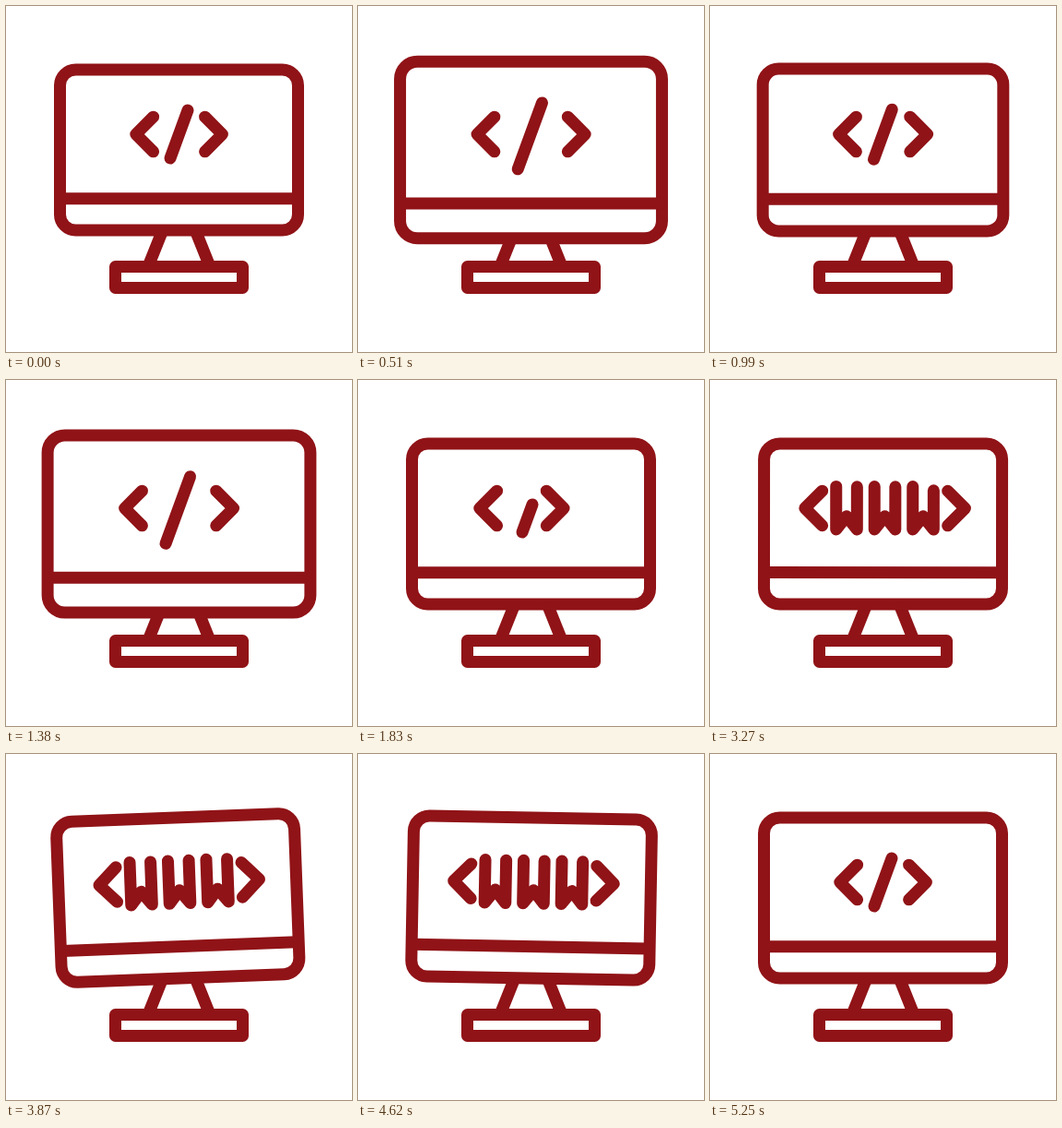
Animation, 375 px wide and 375 px high, one loop 5.4 s. Source, as an HTML page with a canvas:

```html
<!DOCTYPE html>
<html lang="en">
<head>
<meta charset="utf-8">
<title>Code monitor</title>
<style>
html, body { margin: 0; width: 100%; height: 100%; overflow: hidden; background: #fff; }
canvas { display: block; }
</style>
</head>
<body>
<canvas id="stage" width="375" height="375"></canvas>
<script>
const ctx = document.getElementById('stage').getContext('2d');
const LOOP = 5400;
const clamp = v => Math.min(1, Math.max(0, v));
const part = (t, a, b) => clamp((t - a) / (b - a));
const ease = p => (1 - Math.cos(Math.PI * p)) / 2;
const mix = (a, b, p) => a + (b - a) * p;

// Value at time t along [time, value] keys, eased between neighbours
function track(t, keys) {
  let value = keys[0][1];
  for (let i = 1; i < keys.length; i++) {
    const [t0, v0] = keys[i - 1], [t1, v1] = keys[i];
    if (t >= t0) value = mix(v0, v1, ease(part(t, t0, t1)));
  }
  return value;
}

function line(points) {
  ctx.beginPath();
  points.forEach(([x, y]) => ctx.lineTo(x, y));
  ctx.stroke();
}

function box(x, y, w, h, r) {
  ctx.beginPath();
  ctx.roundRect(x, y, w, h, r);
  ctx.fill();
  ctx.stroke();
}

function chevron(x, dir) {
  line([[x - dir * 18.8, 120.2], [x, 139], [x - dir * 18.8, 157.8]]);
}

// Letter W, drawn from its first stroke up to the share p
function letter(x, p) {
  if (p <= 0) return;
  ctx.setLineDash([129 * p, 300]);
  line([[x - 11.3, 115.5], [x - 11.3, 162], [x, 147.8], [x + 11.3, 162], [x + 11.3, 115.5]]);
  ctx.setLineDash([]);
}

function stand() {
  line([[171, 240], [155, 280]]);
  line([[204, 240], [220, 280]]);
  box(118.5, 282.5, 138, 23, 0);
}

function screen(pulse) {
  const s = 1 + 0.105 * pulse;
  const x = 187.5 - 129 * s, right = 187.5 + 129 * s;
  const y = 156 - 87 * s, divider = 156 + 52.7 * s;
  box(x, y, 258 * s, 174 * s, 17 * s);
  line([[x + 2, divider], [right - 2, divider]]);
}

function text(t, pulse) {
  // Typing runs forward, then rewinds before the loop closes
  const u = t < 4650 ? t : mix(3300, 1750, part(t, 4650, 5220));
  const spread = 12.3 * pulse;
  const left = -38 * ease(part(u, 1750, 2000));
  const right = u < 1980
    ? -41 * ease(part(u, 1750, 1980))
    : mix(-41, 42, part(u, 1980, 3100));
  chevron(140.8 + left - spread, -1);
  chevron(234.4 + right + spread, 1);

  const slash = 1 - ease(part(u, 1750, 1930));
  if (slash > 0) {
    const k = 1 + 0.4 * pulse, reach = k * (2 * slash - 1);
    const cx = 187.5 - 1.2 * pulse, cy = 139 + 2 * pulse;
    line([[cx - 9.5 * k, cy + 26 * k], [cx + 9.5 * reach, cy - 26 * reach]]);
  }
  [1940, 2500, 3040].forEach((start, i) =>
    letter(148 + 41.5 * i, ease(part(u, start, start + 260))));
}

function draw(t) {
  const pulse = t < 1800 ? (1 - Math.cos(2 * Math.PI * t / 900)) / 2 : 0;
  const tilt = track(t, [[3250, 0], [3550, 3.5], [4000, -3.5],
                         [4440, 3.5], [4890, -3.5], [5200, 0]]);
  ctx.clearRect(0, 0, 375, 375);
  ctx.strokeStyle = '#901317';
  ctx.fillStyle = '#fff';
  ctx.lineWidth = 13;
  ctx.lineCap = ctx.lineJoin = 'round';
  stand();
  ctx.save();
  ctx.translate(187.5, 187.5);
  ctx.rotate(tilt * Math.PI / 180);
  ctx.translate(-187.5, -187.5);
  screen(pulse);
  text(t, pulse);
  ctx.restore();
}

function tick() {
  draw(performance.now() % LOOP);
  requestAnimationFrame(tick);
}
tick();
</script>
</body>
</html>
```
